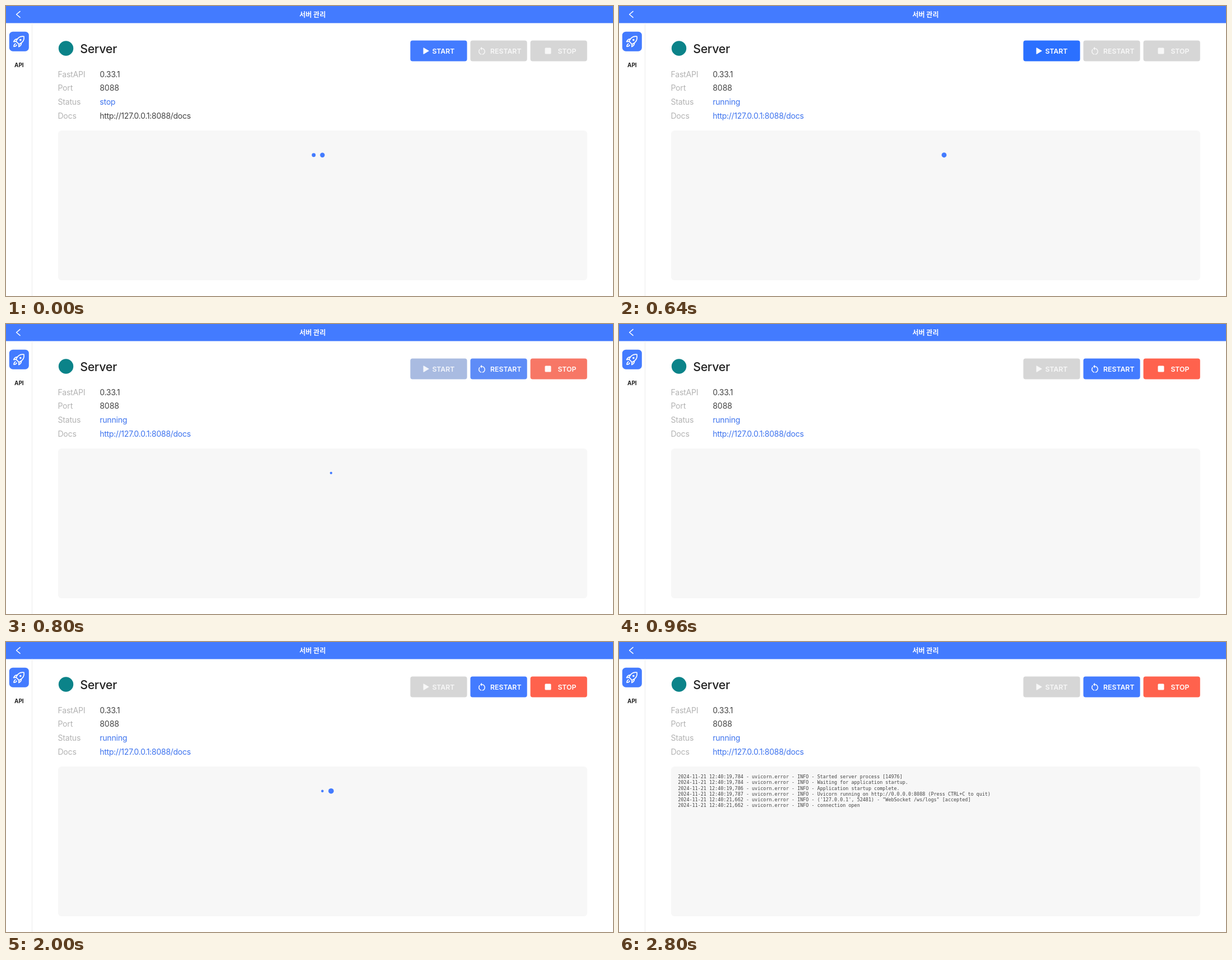
Write an HTML page with a canvas that moves like this. It is 1083 by 517 pixels and loops after 4 s.

```html
<!DOCTYPE html>
<html lang="ko">
<head>
<meta charset="utf-8">
<title>서버 관리</title>
<style>
  html, body { margin: 0; width: 100%; height: 100%; overflow: hidden; background: #fff; }
  canvas { display: block; width: 1083px; height: 517px; }
</style>
</head>
<body>
<canvas id="stage"></canvas>
<script>
const W = 1083, H = 517, LOOP = 4000, STEP = 80;
const HOVER_AT = 240, RUN_AT = 640, LOGS_AT = 2080;

const canvas = document.getElementById('stage');
const dpr = window.devicePixelRatio || 1;
canvas.width = Math.round(W * dpr);
canvas.height = Math.round(H * dpr);
const ctx = canvas.getContext('2d');
ctx.scale(dpr, dpr);

const SANS = 'Inter, sans-serif';
const MONO = '"DejaVu Sans Mono", monospace';
const KOREAN = '"Noto Sans CJK KR", "Noto Sans CJK", sans-serif';
const BLUE = [67, 123, 255], HOVER = [43, 112, 255];
const GRAY = [214, 214, 214], RED = [255, 98, 77];
const ACCENT = '#437bff', LINK = '#3d73ee';

const LOGS = [
  ['19,784', 'Started server process [14976]'],
  ['19,784', 'Waiting for application startup.'],
  ['19,786', 'Application startup complete.'],
  ['19,787', 'Uvicorn running on http://0.0.0.0:8088 (Press CTRL+C to quit)'],
  ['21,662', '(\'127.0.0.1\', 52481) - "WebSocket /ws/logs" [accepted]'],
  ['21,662', 'connection open']
].map(([sec, msg]) => `2024-11-21 12:40:${sec} - uvicorn.error - INFO - ${msg}`);

const clamp = x => Math.min(1, Math.max(0, x));
const easeOut = x => 1 - (1 - x) ** 2;
const mix = (a, b, k) => a.map((v, i) => v + (b[i] - v) * k);
const rgb = c => `rgb(${c.map(Math.round).join(',')})`;

function box(x, y, w, h, r, fill) {
  ctx.fillStyle = fill;
  ctx.beginPath();
  ctx.roundRect(x, y, w, h, r);
  ctx.fill();
}

function dot(x, y, r, fill) {
  ctx.fillStyle = fill;
  ctx.beginPath();
  ctx.arc(x, y, r, 0, Math.PI * 2);
  ctx.fill();
}

function text(str, x, y, font, fill, spacing = 0, align = 'left') {
  ctx.font = font;
  ctx.fillStyle = fill;
  ctx.textAlign = align;
  ctx.letterSpacing = spacing + 'px';
  ctx.fillText(str, x, y);
}

function strokePath(d, width, color) {
  ctx.strokeStyle = color;
  ctx.lineWidth = width;
  ctx.lineCap = ctx.lineJoin = 'round';
  ctx.stroke(new Path2D(d));
}

function drawFrame() {
  box(0, 0, W, H, 0, '#fff');
  box(0, 0, W, 30.5, 0, ACCENT);
  strokePath('M25 9.6 L18.6 15 L25 20.4', 1.5, '#fff');
  text('서버 관리', 547, 19.6, `bold 12px ${KOREAN}`, '#fff', 0, 'center');

  box(46, 30.5, 1, H - 30.5, 0, '#ececec');
  box(5.8, 45.7, 35, 35, 6.5, ACCENT);
  drawRocket();
  text('API', 23.2, 108.6, `700 10px ${SANS}`, '#222', -0.2, 'center');
}

function drawRocket() {
  strokePath('M32 54.3 C26 53.6 20.5 56.5 18 63.2 L23.2 68.2 C30 65.5 32.8 60 32 54.3 Z', 1.7, '#fff');
  strokePath('M20.6 58.8 C17 58.6 15 60.5 13.6 63.6 L18 63.2', 1.7, '#fff');
  strokePath('M27.4 65.8 C27.6 69 25.8 71.2 22.8 72.6 L23.2 68.2', 1.7, '#fff');
  strokePath('M16.8 67.2 C14.6 68 14.2 70 14 72.2 C16.4 72 18.4 71.4 19 69.4', 1.7, '#fff');
  dot(25.8, 60.6, 1.8, '#fff');
}

function drawInfo(running) {
  dot(107, 75.5, 13.2, '#0b8389');
  text('Server', 132.2, 83.7, `450 21.3px ${SANS}`, '#222', -0.3);
  const rows = [
    ['FastAPI', '0.33.1', '#444', -0.28],
    ['Port', '8088', '#444', 0],
    ['Status', running ? 'running' : 'stop', LINK, -0.2],
    ['Docs', 'http://127.0.0.1:8088/docs', running ? LINK : '#444', -0.28]
  ];
  rows.forEach(([label, value, color, spacing], i) => {
    const y = 126.6 + i * 24.7;
    text(label, 92.4, y, `14px ${SANS}`, '#b3b3b3', -0.15);
    text(value, 167.2, y, `14px ${SANS}`, color, spacing);
  });
}

const icons = {
  play(ink) {
    ctx.fillStyle = ink;
    ctx.fill(new Path2D('M744.5 75 Q744.5 74 745.5 74.5 L754.2 79.5 Q755 80 754.2 80.6 L745.5 85.7 Q744.5 86.2 744.5 85.2 Z'));
  },
  restart(ink) {
    ctx.strokeStyle = ctx.fillStyle = ink;
    ctx.lineWidth = 1.5;
    ctx.lineCap = 'butt';
    for (const [from, to] of [[-90, 82], [98, 225]]) {
      ctx.beginPath();
      ctx.arc(849, 81, 5.2, from * Math.PI / 180, to * Math.PI / 180);
      ctx.stroke();
    }
    ctx.fill(new Path2D('M849 72.8 L846 75.8 L849 78.8 Z'));
  },
  square(ink) { box(961.5, 74.5, 11, 11, 1.5, ink); }
};

function button(slot, label, textX, icon, color, on) {
  box(721.4 + slot * 107.1, 61.4, 101.2, 37.2, 4, rgb(color));
  const ink = `rgba(255,255,255,${0.8 + 0.2 * on})`;
  icons[icon](ink);
  text(label, textX, 84.6, `600 12.3px ${SANS}`, ink);
}

function drawButtons(t) {
  const hover = easeOut(clamp((t - HOVER_AT) / 240));
  const run = easeOut(clamp((t - RUN_AT) / 280));
  const off = run ** 1.5;
  button(0, 'START', 760.4, 'play', mix(mix(BLUE, HOVER, hover), GRAY, off), 1 - off);
  button(1, 'RESTART', 864, 'restart', mix(GRAY, BLUE, run), run);
  button(2, 'STOP', 984.4, 'square', mix(GRAY, RED, run), run);
}

// Each dot swells and shrinks for 800 ms of a 1565 ms cycle, 360 ms after its neighbour.
function drawLoader(t) {
  const cycle = 1565, half = 400;
  for (let i = 0; i < 3; i++) {
    const shift = t + 208 - i * 360;
    const phase = shift - cycle * Math.round(shift / cycle);
    if (Math.abs(phase) >= half) continue;
    dot(549 + i * 15.5, 265.7, 5.05 * Math.cos(phase / half * Math.PI / 2), ACCENT);
  }
}

function drawLogs() {
  LOGS.forEach((line, i) => text(line, 105.2, 243.2 + i * 10.16, `8.44px ${MONO}`, '#444'));
}

function render(now) {
  const t = Math.floor(now % LOOP / STEP) * STEP;
  drawFrame();
  drawInfo(t >= RUN_AT);
  drawButtons(t);
  box(93, 222, 944, 267, 6, '#f7f7f7');
  if (t < LOGS_AT) drawLoader(t);
  else drawLogs();
}

function tick() {
  render(performance.now());
  requestAnimationFrame(tick);
}
tick();
</script>
</body>
</html>
```
